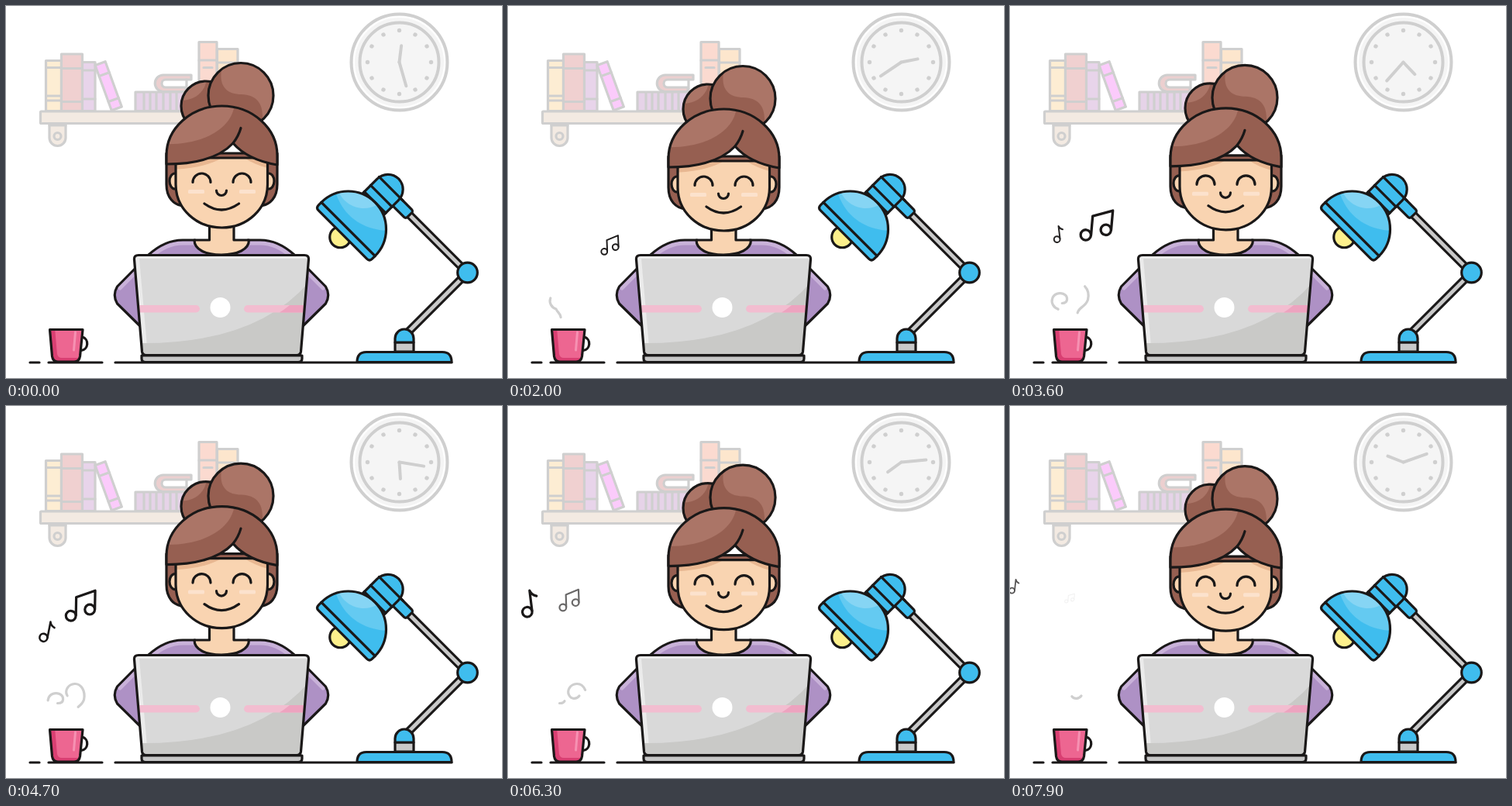
An HTML page that plays this animation: 640 by 480 pixels, repeating every 8 s.

```html
<!DOCTYPE html>
<html lang="en">
<head>
<meta charset="utf-8">
<title>Working at the desk</title>
<style>
  html, body { margin: 0; width: 100%; height: 100%; overflow: hidden; background: #fff; }
  svg { display: block; width: 640px; height: 480px; }
  .ink { stroke: #1a1818; stroke-width: 3.2; }
  .pale { stroke: #cfcfcf; stroke-width: 3.2; }
  .bare { stroke: none; }
  .hair { fill: #965f51; }
  .shine { fill: #ab7567; stroke: none; }
  .skin { fill: #f9d4b1; }
  .blue { fill: #3fbdee; }
  .top { fill: #ae91c5; }
  .glow { fill: none; stroke: #c9b2d9; stroke-width: 5; }
</style>
</head>
<body>
<svg viewBox="0 0 640 480" fill="none" stroke-linecap="round" stroke-linejoin="round">
  <defs>
    <path id="lidShape" d="M165.500 327Q165 321.500 171 321.500H385Q391 321.500 390.500 327L380.500 446Q380 450.500 375 450.500H181Q176 450.500 175.500 446Z"/>
    <path id="faceShape" d="M219 196V230C219 262 246 286 278.500 286S337.500 262 337.500 230V196Z"/>
    <path id="fringeShape" d="M207 204V193A71.500 64 0 0 1 350 193V205C326 201 306 192 293 177C277 194 248 204 207 204Z"/>
    <path id="cupShape" d="M56.500 417.500H99L95.500 452Q94.500 459 88 459H67Q60.500 459 59.500 452Z"/>
    <path id="domeShape" d="M-49 0A49 49 0 0 1 49 0Z"/>
    <path id="armShape" d="M244 302H228C210 302 196 310 184 321L143.500 362Q137 373 143.500 384L176 416L278 420V302Z"/>
    <clipPath id="lidClip"><use href="#lidShape"/></clipPath>
    <clipPath id="faceClip"><use href="#faceShape"/></clipPath>
    <clipPath id="fringeClip"><use href="#fringeShape"/></clipPath>
    <clipPath id="cupClip"><use href="#cupShape"/></clipPath>
    <clipPath id="domeClip"><use href="#domeShape"/></clipPath>
    <clipPath id="armClip"><use href="#armShape"/></clipPath>
    <clipPath id="bunClip"><circle cx="303" cy="115.500" r="42"/></clipPath>
    <clipPath id="knotClip"><circle cx="258" cy="129" r="32"/></clipPath>
  </defs>

  <!-- shelf -->
  <g class="pale">
    <path fill="#f3eae2" d="M56 152V170A10.500 10.500 0 0 0 77 170V152Z"/>
    <path d="M56 154H77"/>
    <circle cx="66.500" cy="168" r="4.500"/>
    <rect fill="#fdedd3" x="51.500" y="70.500" width="20" height="65"/>
    <path d="M52 79.500H71M52 116H71M52 122H71"/>
    <rect fill="#e8d4ea" x="98" y="72.500" width="17" height="63"/>
    <path d="M98 83H115M98 120H115"/>
    <rect fill="#f0d0d0" x="71.500" y="62" width="27" height="73.500"/>
    <path d="M72 80.500H98M72 123.500H98"/>
    <g transform="translate(115 76.500) rotate(-20)">
      <rect fill="#fbcbfb" width="14" height="62"/>
      <path d="M0 15H14M0 50H14"/>
    </g>
    <rect fill="#e6d3e8" x="167" y="111" width="70" height="24.500"/>
    <path d="M178 112V135M186 112V135M194 112V135M203 112V135M212 112V135M220 112V135"/>
    <path fill="#eccfcf" d="M239 89H203A10.700 10.700 0 0 0 203 110.500H232V105H206A5 5 0 0 1 206 95H239Z"/>
    <path d="M233 95V108"/>
    <rect fill="#fbdad0" x="249" y="46.500" width="23" height="62"/>
    <path d="M249 70H272M255 79.500H266"/>
    <rect fill="#fde6cd" x="272.500" y="55.500" width="26.500" height="50"/>
    <path d="M273 73H299"/>
    <rect fill="#f3eae2" x="44.500" y="136" width="195" height="15.500" rx="1"/>
  </g>

  <!-- clock -->
  <g class="pale" stroke-width="4" transform="translate(507.500 72.500)">
    <circle r="62" fill="#f5f5f5" style="stroke-width:4"/>
    <circle r="58.500" stroke="#fff" style="stroke:#fff;stroke-width:2"/>
    <circle r="51" fill="#f5f5f5" style="stroke-width:4"/>
    <g id="ticks" fill="#cfcfcf" stroke="none"></g>
    <path id="hour" d="M0 0V-21.500" style="stroke-width:4"/>
    <path id="minute" d="M0 0V-32" style="stroke-width:4"/>
  </g>

  <!-- body -->
  <g id="arm">
    <use href="#armShape" class="top"/>
    <g clip-path="url(#armClip)">
      <path class="glow" d="M244 306H228C211 306 198 314 187 324L147 364"/>
    </g>
    <path class="ink" d="M244 302H228C210 302 196 310 184 321L143.500 362Q137 373 143.500 384L176 416"/>
  </g>
  <use href="#arm" transform="matrix(-1 0 0 1 556 0)"/>
  <path class="skin ink" d="M262.500 276V302H243C243 314 257 321 278 321S313.500 314 313.500 302H294V276"/>

  <g id="head">
    <path class="hair ink" d="M207 190V230C207 247 216 257 230 258H327C341 257 350 247 350 230V190Z"/>
    <circle class="hair" cx="258" cy="129" r="32"/>
    <path class="shine" clip-path="url(#knotClip)" d="M224 122C244 122 256 112 259 95H224Z"/>
    <circle class="ink" cx="258" cy="129" r="32"/>
    <circle class="hair" cx="303" cy="115.500" r="42"/>
    <path class="shine" clip-path="url(#bunClip)" d="M281 70C272 98 280 114 304 114C324 115 332 126 331 146L350 145V70Z"/>
    <circle class="ink" cx="303" cy="115.500" r="42"/>
    <ellipse class="skin ink" cx="218" cy="226" rx="7" ry="10"/>
    <ellipse class="skin ink" cx="339" cy="226" rx="7" ry="10"/>
    <use href="#faceShape" class="skin"/>
    <path clip-path="url(#faceClip)" fill="#e8b791" d="M207 211C250 211 278 201 294 184C308 200 328 208 350 212V190H207Z"/>
    <g fill="#fce2cd">
      <rect x="235" y="237" width="21" height="5" rx="1.500"/>
      <rect x="301" y="237" width="21" height="5" rx="1.500"/>
    </g>
    <use href="#faceShape" class="ink"/>
    <use href="#fringeShape" class="hair"/>
    <path class="shine" clip-path="url(#fringeClip)" d="M200 178C250 181 292 160 295 126H200Z"/>
    <use href="#fringeShape" class="ink"/>
    <path class="ink" d="M293 177Q300 168 303 157.500"/>
    <path class="ink" d="M241 227.500A11.500 11.500 0 0 1 264 227.500M293 227.500A11.500 11.500 0 0 1 316 227.500M271.500 238A6.500 6.500 0 0 0 284.500 238M256 255Q278 271 300.500 255"/>
  </g>

  <!-- desk line -->
  <path class="ink" d="M31 460H43M55 460H124M141 460H575"/>

  <!-- laptop -->
  <g clip-path="url(#lidClip)">
    <rect x="160" y="318" width="235" height="136" fill="#d9d9d9"/>
    <path fill="#ebebeb" d="M165 321H391V326H172L183 451H174Z"/>
    <path fill="#c9c9c7" d="M170 435Q322 437 392 355V455H170Z"/>
    <rect x="150" y="386" width="100" height="9.500" rx="4.700" fill="#f2bdd0"/>
    <rect x="307" y="386" width="100" height="9.500" rx="4.700" fill="#f2bdd0"/>
    <path fill="#eda3bf" d="M353 395.500Q360 391 366 386H392V395.500Z"/>
  </g>
  <circle cx="276.500" cy="389" r="13" fill="#fff"/>
  <use href="#lidShape" class="ink"/>
  <path class="ink" fill="#c6c6c6" d="M175 451H382V455Q382 459.500 377 459.500H180Q175 459.500 175 455Z"/>

  <!-- cup -->
  <path class="ink" d="M98.500 427A9 9 0 0 1 97 444.500"/>
  <g clip-path="url(#cupClip)">
    <rect x="50" y="412" width="55" height="50" fill="#ed6691"/>
    <path fill="#d93f72" d="M54 415H63L66 449Q67 454 72 454H98V462H54Z"/>
    <path stroke="#f691b2" stroke-width="3" d="M89.500 421L87.500 444"/>
  </g>
  <use href="#cupShape" class="ink"/>
  <g class="pale">
    <path id="steamA" pathLength="72" d="M68 404C69 397 64 396 62 391C56 389 53 383 54.500 378C56 372 63 369 69 371.500C75 374 76 384 66.500 383.500"/>
    <path id="steamB" pathLength="91" d="M87 400C86 388 97 390 100.500 379C103 368 97 358 88.500 358.500C80 359 76 367 78.500 372.500C81 378.500 88 379 92 374"/>
  </g>

  <!-- lamp -->
  <g id="lamp">
    <path stroke="#1a1818" stroke-width="11" d="M595.500 344L515 424.500"/>
    <path stroke="#c9c9c9" stroke-width="4.800" d="M595.500 344L515 424.500"/>
    <rect class="ink" fill="#c9c9c9" x="502" y="434" width="24" height="12"/>
    <path class="blue ink" d="M502 434V429A12 12 0 0 1 526 429V434Z"/>
    <path class="blue ink" d="M453 459.500Q453 446.500 465 446.500H563Q575 446.500 575 459.500Z"/>
    <g transform="translate(441.500 288) rotate(45)">
      <path stroke="#1a1818" stroke-width="11" d="M40 -69H148"/>
      <path stroke="#c9c9c9" stroke-width="4.800" d="M40 -69H148"/>
      <rect class="blue ink" x="16" y="-76" width="27" height="14" rx="3"/>
      <path class="blue ink" d="M-19.500 -42V-72A19.500 20 0 0 1 19.500 -72V-42Z"/>
      <path class="ink" d="M-19.500 -60.500H19.500M-19.500 -76H24M-19.500 -49H19.500"/>
      <circle class="ink" fill="#fdf08c" cy="14.500" r="13.500"/>
      <use href="#domeShape" class="blue"/>
      <g clip-path="url(#domeClip)">
        <g transform="rotate(-45) translate(-441.500 -288)">
          <path fill="#64caf1" d="M424 236C434 274 464 290 496 290V230Z"/>
          <path fill="#86d5f4" d="M427 234C434 258 460 268 480 256V230Z"/>
        </g>
      </g>
      <use href="#domeShape" class="ink"/>
      <path class="blue ink" d="M-49 0H49V5Q49 10 44 10H-44Q-49 10 -49 5Z"/>
    </g>
    <circle class="blue ink" cx="595.500" cy="344" r="12.800"/>
  </g>

  <!-- notes -->
  <g id="pair" class="ink">
    <circle cx="-18.500" cy="17" r="6.400"/>
    <circle cx="5.800" cy="8.500" r="6.400"/>
    <path d="M-12 16V-7L12.300 -16V8"/>
  </g>
  <g id="single" class="ink">
    <circle cx="-6.300" cy="1" r="6.300"/>
    <path d="M0 0V-26Q2 -20 8 -18"/>
  </g>
</svg>
<script>
  const LOOP = 8, STEP = 0.1;
  const el = id => document.getElementById(id);

  el('ticks').innerHTML = Array.from({ length: 12 }, (_, i) =>
    `<circle r="2.700" cy="-41" transform="rotate(${i * 30})"/>`).join('');

  // Rows: time, x, y, scale, tilt, opacity
  const pairKeys = [
    [0.8, 145, 314, 0.15, 4, 0],
    [1.2, 142.5, 311, 0.36, 5, 0.8],
    [2.8, 127, 299, 0.83, -8, 1],
    [3.6, 118.5, 279.5, 1.04, 5, 1],
    [4.7, 102.5, 254, 1, 1, 1],
    [6.3, 83, 248, 0.68, -2, 0.65],
    [7.9, 79, 247, 0.32, 4, 0.06]
  ];
  const singleKeys = [
    [2, 66, 297, 0.15, 4, 0],
    [2.8, 65.5, 298, 0.4, -3, 0.65],
    [3.6, 64.5, 300, 0.62, -7, 0.95],
    [4.7, 53.5, 299, 0.8, 11, 1],
    [6.3, 31, 264, 1, -7, 1],
    [7.9, 6, 238, 0.55, 6, 0.75]
  ];

  // Smooth curve through the rows
  function sample(keys, t) {
    const last = keys.length - 1;
    if (t <= keys[0][0]) return keys[0];
    if (t >= keys[last][0]) return keys[last];
    const i = keys.findIndex(k => k[0] > t) - 1;
    const a = keys[i], b = keys[i + 1], span = b[0] - a[0], u = (t - a[0]) / span;
    const slope = (j, c) => {
      const p = keys[Math.max(j - 1, 0)], n = keys[Math.min(j + 1, last)];
      return (n[c] - p[c]) / (n[0] - p[0]) * span;
    };
    return a.map((v, c) => {
      const d = b[c] - v, m = slope(i, c), n = slope(i + 1, c);
      return v + u * (m + u * (3 * d - 2 * m - n + u * (m + n - 2 * d)));
    });
  }

  function place(id, keys, t) {
    const [, x, y, scale, tilt, alpha] = sample(keys, t);
    el(id).setAttribute('transform', `translate(${x} ${y}) rotate(${tilt}) scale(${scale})`);
    el(id).setAttribute('opacity', Math.min(1, Math.max(0, alpha)));
  }

  function steam(id, length, head, tail) {
    const end = Math.min(length, head), shown = end - tail;
    el(id).style.display = shown > 0 ? '' : 'none';
    el(id).setAttribute('stroke-dasharray', `${Math.max(shown, 0)} 300`);
    el(id).setAttribute('stroke-dashoffset', -tail);
  }

  const squareFrom = (t, start) => Math.max(0, t - start) ** 2;

  function draw(now) {
    const t = Math.floor(now / 1000 % LOOP / STEP + 1e-6) * STEP;
    const phase = t / 5 % 1;
    const bob = 5 * (1 - Math.abs(1 - 2 * phase));
    el('head').setAttribute('transform', `translate(0 ${bob})`);
    el('hour').setAttribute('transform', `rotate(${7 + 36 * t})`);
    el('minute').setAttribute('transform', `rotate(${164 + 216 * t})`);
    steam('steamA', 72, 23 * (t - 0.5), 2.28 * squareFrom(t, 1));
    steam('steamB', 91, 28 * (t - 2), 2.45 * squareFrom(t, 2.3));
    place('pair', pairKeys, t);
    place('single', singleKeys, t);
    requestAnimationFrame(draw);
  }
  draw(performance.now());
</script>
</body>
</html>
```
